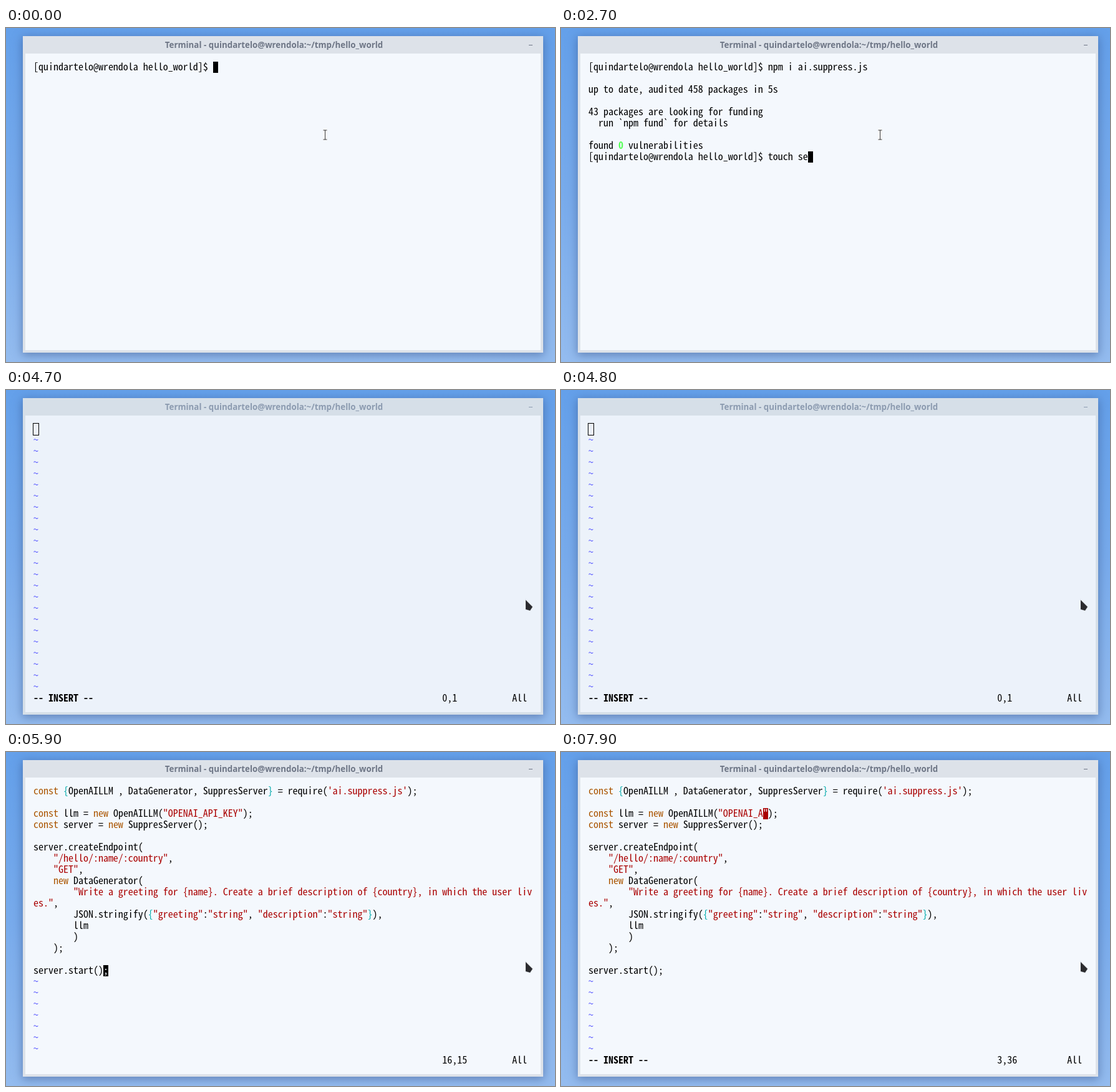
These frames come from a looping animation (880x536 px, 8 s). An HTML page:

```html
<!DOCTYPE html>
<html lang="en">
<head>
<meta charset="utf-8">
<title>Terminal</title>
<style>
  html, body { margin: 0; width: 100%; height: 100%; overflow: hidden; }
  body { position: relative; background: linear-gradient(#64a0ea, #78abec 50%, #94bcef); }
  .window {
    position: absolute; left: 27px; top: 13px; width: 834px; height: 508px;
    background: #dde2e9; box-shadow: 0 3px 14px 1px rgba(50, 75, 130, .5);
  }
  .title {
    position: absolute; left: 0; top: 0; width: 805px; height: 28px;
    font: bold 13.333px/28px "Noto Sans", sans-serif; text-align: center; white-space: pre; color: #6e7686;
  }
  .minimize { position: absolute; left: 811px; top: 14px; width: 6px; height: 1px; background: #6e7686; }
  .paper { position: absolute; left: 4px; top: 28px; width: 826px; height: 476px; background: #f4f8fd; }
  .blurred { background: #d6dfe8; }
  .blurred .title { color: #8c9bb0; }
  .blurred .minimize { background: #8c9bb0; }
  .blurred .paper { background: #ecf2fa; }
  #screen, .glyph {
    position: absolute; margin: 0; white-space: pre;
    font: 16px/18px "Noto Sans Mono CJK JP", "Noto Sans Mono", monospace;
    font-size-adjust: ch-width .5;
  }
  #screen { left: 44px; top: 52px; color: #000; }
  #cursor { position: absolute; width: 8px; height: 18px; background: #000; color: #f4f8fd; }
  .glyph { left: 0; top: -2px; }
  #cursor.string { background: #a00; }
  #cursor.hollow { margin: -1px; background: none; border: 1px solid #000; }
  .keyword { color: #a50; }
  .string { color: #a00; }
  .brace { color: #0aa; }
  .tilde { color: #55f; }
  .zero { color: #5f5; font-weight: bold; }
  svg { position: absolute; left: 0; top: 0; overflow: visible; }
</style>
</head>
<body>
<div class="window" id="window">
  <div class="title">Terminal - quindartelo@wrendola:~/tmp/hello_world</div>
  <div class="minimize"></div>
  <div class="paper"></div>
</div>
<pre id="screen"></pre>
<div id="cursor"><span class="glyph" id="glyph"></span></div>
<svg width="1" height="1">
  <g id="ibeam" fill="none">
    <path d="M-3 -7.5H3M-3 7.5H3M0 -7.5V7.5" stroke="#fff" stroke-width="3"/>
    <path d="M-3 -7.5H3M-3 7.5H3M0 -7.5V7.5" stroke="#333"/>
  </g>
  <path id="arrow" d="M0 0L11 11L7 17L0 15Z" fill="#2b2b2e" stroke="#e4e9f0" stroke-width="2" paint-order="stroke"/>
</svg>
<script>
const LOOP = 8000, STEP = 100;
const PROMPT = '[quindartelo@wrendola hello_world]$ ';
const INSTALL = 'npm i ai.suppress.js', TOUCH = 'touch server.js', EDIT = 'vim server.js';
const REPORT = `
up to date, audited 458 packages in 5s

43 packages are looking for funding
  run \`npm fund\` for details

found <span class="zero">0</span> vulnerabilities`;
const KEY = 'OPENAI_API_KEY';

const code = key => `const {OpenAILLM , DataGenerator, SuppresServer} = require('ai.suppress.js');

const llm = new OpenAILLM("${key}");
const server = new SuppresServer();

server.createEndpoint(
    "/hello/:name/:country",
    "GET",
    new DataGenerator(
        "Write a greeting for {name}. Create a brief description of {country}, in which the user liv
es.",
        JSON.stringify({"greeting":"string", "description":"string"}),
        llm
        )
    );

server.start();`;

const $ = id => document.getElementById(id);
const span = (kind, text) => `<span class="${kind}">${text}</span>`;

const highlight = text => text.replace(/"[^"]*"|'[^']*'|\b(?:const|new)\b|[{}]/g, token =>
  span(/["']/.test(token[0]) ? 'string' : /[{}]/.test(token) ? 'brace' : 'keyword', token));

// Piecewise linear value through [time, value] points
function at(points, t) {
  if (t <= points[0][0]) return points[0][1];
  for (let i = 1; i < points.length; i++) {
    const [t0, a] = points[i - 1], [t1, b] = points[i];
    if (t <= t1) return a + (b - a) * (t - t0) / (t1 - t0);
  }
  return points[points.length - 1][1];
}
const typed = (text, points, t) => text.slice(0, Math.floor(at(points, t) + 1e-6));

function setCursor(row, col, char = '', kind = '') {
  const cursor = $('cursor');
  cursor.style.left = 44 + col * 8 + 'px';
  cursor.style.top = 54 + row * 18 + 'px';
  cursor.className = kind;
  $('glyph').textContent = char;
}

function drawShell(t) {
  const first = typed(INSTALL, [[400, 0], [1100, 7], [1200, 7], [1300, 9], [1500, 12], [2100, 20]], t);
  let text = PROMPT + first;
  if (t >= 2200) text += '\n';
  if (t >= 2400) text += REPORT + '\n' + PROMPT + typed(TOUCH, [[2400, 0], [2700, 8], [3400, 15]], t);
  if (t >= 3500) text += '\n' + PROMPT + typed(EDIT, [[3500, 0], [3900, 4], [4000, 4], [4100, 6], [4200, 13]], t);
  $('screen').innerHTML = text;
  const rows = $('screen').textContent.split('\n');
  setCursor(rows.length - 1, rows[rows.length - 1].length);
}

function drawEditor(t, blurred) {
  const pasted = t >= 5200;
  const removed = Math.floor(at([[7400, 0], [7900, 6]], t) + 1e-6);
  const key = KEY.slice(0, KEY.length - removed);
  const text = pasted ? code(key) : '';
  const rows = text.split('\n');
  const insert = t >= 4500 && t < 5700 || t >= 7400;

  const line = pasted ? Math.round(at([[5900, 16], [6900, 3]], t)) : 1;
  const row = line > 10 ? line : line - 1;
  let column = Math.min(15, rows[row].length);
  if (t >= 7000) column = [17, 26, 28][(t - 7000) / STEP] || 28 + key.length;
  else if (pasted && insert) column = 16;

  const position = !pasted ? (insert ? '0,1' : '0,0-1') : line + ',' + (column || '0-1');
  const message = insert ? '-- INSERT --' : pasted ? '' : '"server.js" 0L, 0B';
  const status = (insert ? `<b>${message}</b>` : message) + ' '.repeat(82 - message.length) +
    position.padEnd(14) + 'All';
  const tildes = span('tilde', '~\n'.repeat(24 - rows.length));
  $('screen').innerHTML = highlight(text) + '\n' + tildes + status;

  const col = Math.max(column - 1, 0);
  const inString = t >= 7200 || line === 7 || line === 10 || line === 8 && column < 10;
  setCursor(row, col, rows[row][col], blurred ? 'hollow' : inString ? 'string' : '');
}

function drawPointer(t) {
  const x = at([[4300, 511.5], [4700, 833]], t), y = at([[4300, 171.5], [4700, 337]], t);
  const parked = t >= 4700;
  $('ibeam').style.display = parked ? 'none' : '';
  $('arrow').style.display = parked ? '' : 'none';
  $(parked ? 'arrow' : 'ibeam').setAttribute('transform', `translate(${x} ${y})`);
}

function draw(t) {
  const blurred = t >= 4600 && t < 5100;
  $('window').classList.toggle('blurred', blurred);
  if (t < 4300) drawShell(t);
  else drawEditor(t, blurred);
  drawPointer(t);
}

const start = performance.now();
let shown = -1;
function tick() {
  const t = Math.floor(((performance.now() - start) % LOOP) / STEP) * STEP;
  if (t !== shown) draw(shown = t);
  requestAnimationFrame(tick);
}
tick();
</script>
</body>
</html>
```
